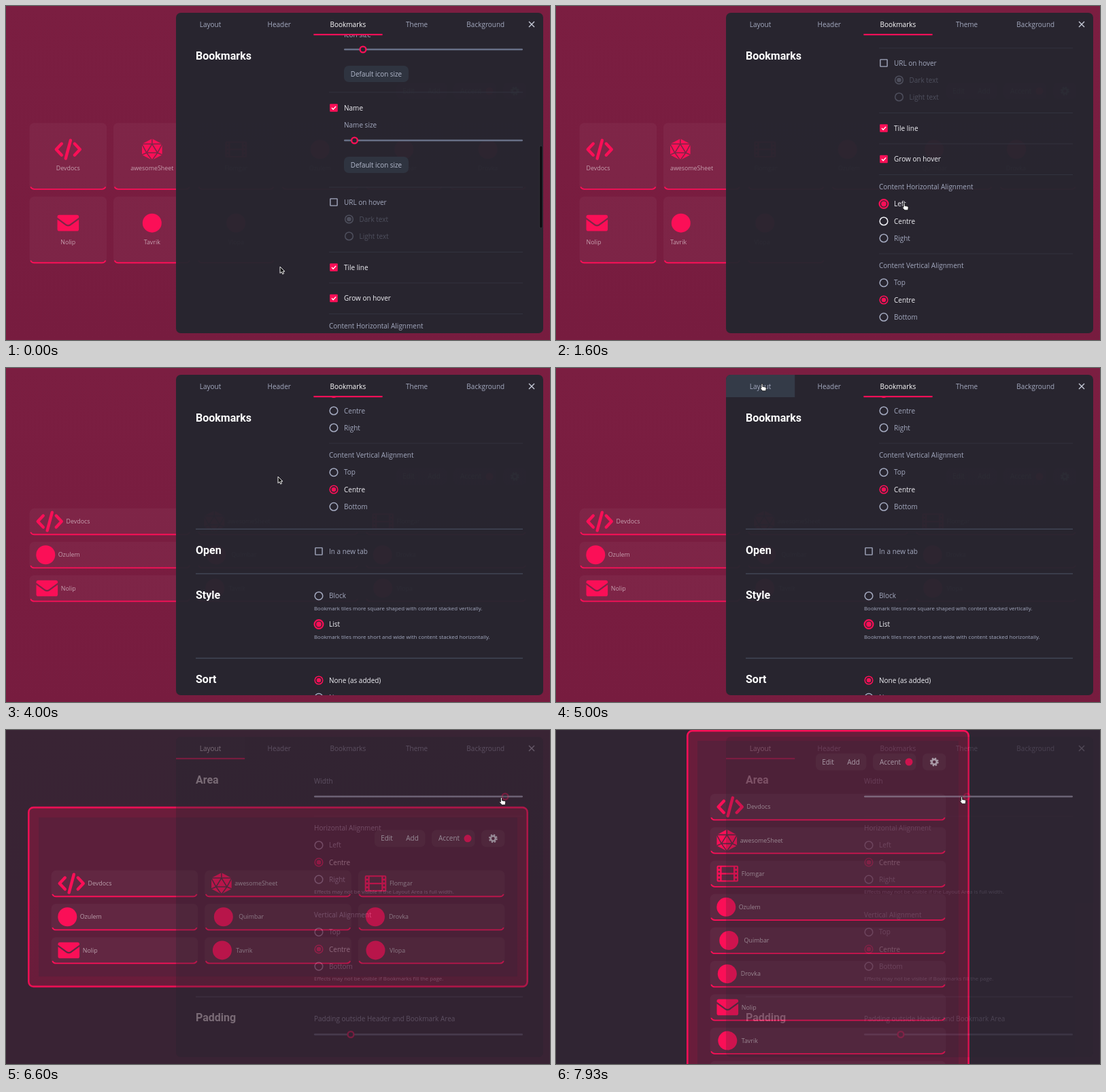
These frames come from a looping animation (800x492 px, 8000 ms). An HTML page:

```html
<!DOCTYPE html>
<html lang="en">
<head>
<meta charset="utf-8">
<title>Bookmark settings</title>
<style>
  html, body { margin: 0; width: 100%; height: 100%; overflow: hidden; background: #7a1e40; }
  svg { display: block; width: 100vw; height: 100vh; }
  text { font-family: "Open Sans", sans-serif; }
  .title { font-family: Roboto, sans-serif; font-stretch: 75%; font-weight: 600; }
</style>
</head>
<body>
<svg viewBox="0 0 800 492">
  <defs>
    <linearGradient id="page" x2="0" y2="1">
      <stop offset="0" stop-color="#7b1e41"/><stop offset="1" stop-color="#771c3f"/>
    </linearGradient>
    <clipPath id="body"><path d="M250 43H790V475a7 7 0 0 1-7 7H257a7 7 0 0 1-7-7Z"/></clipPath>
    <clipPath id="panel"><rect x="250" y="10" width="540" height="472" rx="7"/></clipPath>
    <mask id="facets" maskUnits="userSpaceOnUse" x="-16" y="-17" width="32" height="34">
      <rect x="-16" y="-17" width="32" height="34" fill="#fff"/>
      <path d="M0-16V-8L-8 5H8L0-8M-15-8L0-8 15-8 8 5 15 8M-15-8L-8 5-15 8M-8 5L0 16 8 5" fill="none" stroke="#000" stroke-width="1.6"/>
    </mask>
    <g id="code" fill="none" stroke="#fb0f57" stroke-width="4.4" stroke-linecap="round" stroke-linejoin="round">
      <path d="M-9.5-8.5L-17.5 0-9.5 8.5M9.5-8.5L17.5 0 9.5 8.5M3.6-13.4L-3.6 13.4"/>
    </g>
    <path id="die" d="M0-15.8L14.8-8V8L0 15.8-14.8 8V-8Z" mask="url(#facets)"/>
    <g id="mail">
      <path d="M-15.8-9Q-15.8-11.8-13-11.8H13Q15.8-11.8 15.8-9V-8L2.5 1.8Q0 3.4-2.5 1.8L-15.8-8Z"/>
      <path d="M-15.8-5.2L-3.5 3.8Q0 6 3.5 3.8L15.8-5.2V9Q15.8 11.8 13 11.8H-13Q-15.8 11.8-15.8 9Z"/>
    </g>
    <path id="film" fill-rule="evenodd"/>
    <circle id="dot" r="14"/>
    <g id="gear" fill="none" stroke="#cbb9c6">
      <circle r="3.6" stroke-width="2.6"/>
      <circle r="5.4" stroke-width="2" stroke-dasharray="2.4 1.84"/>
    </g>
    <path id="arrow" d="M0 0V9.6L2.2 7.6 3.8 11 5.5 10.2 4 7H7Z" fill="#111" stroke="#fff" stroke-width=".9"/>
    <path id="hand" d="M-1 1a1 1 0 0 1 2 0V4.4L5 5.1Q6.4 5.5 6.2 7L5.6 10.8H.8L-2.8 6.8Q-2.5 5.5-1 6.5Z" fill="#fff" stroke="#111" stroke-width=".8"/>
  </defs>
  <g id="scene"></g>
</svg>
<script>
const LOOP = 8000, RED = '#fb0f57', GREY = '#a3a9bf', WHITE = '#f0f0f5', PANEL = '#26262f';
const CLICK_LEFT = 1520, CLICK_LIST = 3540, CLICK_LAYOUT = 5100, DRAG = 6330;
const scene = document.getElementById('scene');

// label, icon, icon width
const BOOKMARKS = [
  ['Devdocs', 'code', 39.5], ['awesomeSheet', 'die', 29.6], ['Flomgar', 'film', 31.6],
  ['Ozulem', 'dot', 27.6], ['Quimbar', 'dot', 35.5], ['Drovka', 'dot', 30.6],
  ['Nolip', 'mail', 31.6], ['Tavrik', 'dot', 31.6], ['Vlopa', 'dot', 31.6]
];

const hole = (x, y, w, h) => `M${x} ${y}h${w}v${h}h${-w}Z`;
document.getElementById('film').setAttribute('d',
  'M-13.8-11.8H13.8Q15.8-11.8 15.8-9.8V9.8Q15.8 11.8 13.8 11.8H-13.8Q-15.8 11.8-15.8 9.8V-9.8Q-15.8-11.8-13.8-11.8Z' +
  hole(-8.7, -9.8, 17.4, 8.7) + hole(-8.7, 1.1, 17.4, 8.7) +
  [-9.8, -4.2, 1.5, 7.1].map(y => hole(-13.7, y, 2.6, 2.7) + hole(11.1, y, 2.6, 2.7)).join(''));

const clamp = v => Math.max(0, Math.min(1, v));
const smooth = v => v * v * (3 - 2 * v);
const linear = v => v;

// Value of a [time, value] track at time t
function track(t, keys, ease = smooth) {
  const i = keys.findIndex(k => k[0] > t);
  if (i === 0) return keys[0][1];
  if (i < 0) return keys[keys.length - 1][1];
  const [t0, a] = keys[i - 1], [t1, b] = keys[i];
  return a + (b - a) * ease((t - t0) / (t1 - t0));
}

const text = (x, y, s, fill = GREY, size = 10, extra = '') =>
  `<text x="${x}" y="${y + size * .36}" font-size="${size}" fill="${fill}" ${extra}>${s}</text>`;
const middle = 'text-anchor="middle"';
const title = (y, s) => text(279, y, s, '#fff', 16, 'class="title"');
const box = (x, y, w, h, fill, r = 0, extra = '') =>
  `<rect x="${x}" y="${y}" width="${w}" height="${h}" rx="${r}" fill="${fill}" ${extra}/>`;
const use = (id, x, y) => `<use href="#${id}" x="${x}" y="${y}" fill="${RED}"/>`;
const faintRule = (y, x = 475) => box(x, y - .5, 760 - x, 1, '#32333f');
const rule = y => box(279, y - .7, 481, 1.4, '#424858');
const note = (y, s) => text(453, y, s, GREY, 7.9);
const rail = (x, y) => box(x, y - 1.2, 760 - x, 2.4, '#687087', 1.2);
const knob = (x, y) => `<circle cx="${x}" cy="${y}" r="4.4" fill="${PANEL}" stroke="${RED}" stroke-width="2.3"/>`;
const button = (y, s) => box(497, y - 12, 95, 24, '#2f3440', 7) + text(544.5, y, s, '#b3b9cc', 9.9, middle);

function radio(x, y, s, on, { focus = false, lit = on, off = false } = {}) {
  const color = off ? '#6d7283' : on ? RED : lit ? WHITE : GREY;
  return `<g opacity="${off ? .55 : 1}"><circle cx="${x}" cy="${y}" r="${focus ? 6.4 : 5.8}" fill="none" stroke="${color}" stroke-width="${focus ? 2.2 : 1.5}"/>` +
    (on ? `<circle cx="${x}" cy="${y}" r="${focus ? 3.9 : 3.3}" fill="${color}"/>` : '') +
    text(x + 15, y, s, off ? color : lit ? WHITE : GREY) + '</g>';
}

function check(x, y, s, on) {
  const mark = on
    ? box(x - 5.8, y - 5.8, 11.6, 11.6, RED, 1) + `<path d="M${x - 3} ${y}l2.2 2.3 4-4.4" fill="none" stroke="#fff" stroke-width="1.4"/>`
    : box(x - 5.1, y - 5.1, 10.2, 10.2, 'none', .5, `stroke="${GREY}" stroke-width="1.4"`);
  return mark + text(x + 15, y, s, on ? WHITE : GREY);
}

function tile([label, icon, iconWidth], x, y, w, h, list, left) {
  const b = y + h - 1, color = '#fff';
  let s = box(x, y, w, h, '#fff', 7, 'fill-opacity=".035"') +
    `<path d="M${x + 1.6} ${b - 3.4}Q${x + 3.4} ${b} ${x + 7} ${b}H${x + w - 7}Q${x + w - 3.4} ${b} ${x + w - 1.6} ${b - 3.4}" fill="none" stroke="${RED}" stroke-width="1.8"/>`;
  const dim = 'fill-opacity=".56"', start = x + 10;
  if (list) return s + use(icon, start + iconWidth / 2, y + h / 2 - .5) +
    text(start + iconWidth + 4.6, y + h / 2 - .5, label, color, 8.9, dim);
  return s + (left
    ? use(icon, start + iconWidth / 2, y + 39) + text(start, y + 67, label, color, 8.9, dim)
    : use(icon, x + w / 2, y + 39) + text(x + w / 2, y + 67, label, color, 8.9, dim + middle.padStart(middle.length + 1)));
}

function headerButtons(right, y) {
  const back = (x, w) => box(right - x, y, w, 25, '#fff', 7, 'fill-opacity=".045"');
  const c = y + 12.5, ink = '#cbb9c6';
  return back(191.5, 74.5) + back(107.5, 63.5) + back(34.5, 34.5) +
    text(right - 173.5, c, 'Edit', ink, 10, middle) + text(right - 136, c, 'Add', ink, 10, middle) +
    text(right - 97.5, c, 'Accent', ink) + `<circle cx="${right - 54.5}" cy="${c}" r="5.5" fill="${RED}"/>` +
    use('gear', right - 17.2, c);
}

function page(t, percent, edit) {
  const list = t >= CLICK_LIST, left = t >= CLICK_LEFT;
  const pad = 34.5, gap = 9.8, width = 8 * percent, x = 400 - width / 2, inner = width - 2 * pad;
  const columns = list ? Math.max(1, Math.floor((inner + gap) / (205 + gap))) : 6;
  const w = (inner - gap * (columns - 1)) / columns, h = list ? 39.4 : 98.6;
  const rows = Math.ceil(BOOKMARKS.length / columns);
  const height = 2 * pad + 59.5 + rows * (h + gap) - gap;
  const top = Math.max(0, 246 - height / 2);
  return box(0, 0, 800, 492, 'url(#page)') +
    `<g opacity="${edit}">` + box(0, 0, 800, 492, '#302533') +
    box(x + 1.3, top + 1.3, width - 2.6, height - 2.6, '#691d3b', 7, `stroke="${RED}" stroke-width="2.6"`) +
    box(x + 16, top + 16, width - 32, height - 32, '#58203b') + '</g>' +
    headerButtons(x + width - pad, top + pad) +
    BOOKMARKS.map((b, i) => tile(b, x + pad + (i % columns) * (w + gap),
      top + pad + 59.5 + Math.floor(i / columns) * (h + gap), w, h, list, left)).join('');
}

function bookmarksTab(t) {
  const scroll = track(t, [[70, 0], [870, 205], [1790, 205], [2440, 427.5], [2600, 427.5], [2900, 459]]);
  const left = t >= CLICK_LEFT, list = t >= CLICK_LIST;
  const bar = track(t, [[870, 1], [1100, 0], [1790, 0], [1860, 1], [3150, 1], [3400, 0]]);
  return title(73, 'Bookmarks') + `<g transform="translate(0 ${-scroll})">` +
    text(497, 42, 'Icon size') + rail(497, 64) + knob(525, 64) + button(100, 'Default icon size') + faintRule(127) +
    check(482, 150, 'Name', true) + text(497, 175, 'Name size') + rail(497, 198) + knob(512.5, 198) +
    button(234, 'Default icon size') + faintRule(267) +
    check(482, 289, 'URL on hover', false) +
    radio(504.5, 314, 'Dark text', true, { off: true }) + radio(504.5, 339, 'Light text', false, { off: true }) + faintRule(362.5) +
    check(482, 385, 'Tile line', true) + faintRule(408) + check(482, 430.5, 'Grow on hover', true) + faintRule(453.5) +
    text(475, 471, 'Content Horizontal Alignment') +
    radio(482, 496.5, 'Left', left, { focus: left && !list }) +
    radio(482, 522, 'Centre', !left, { lit: t < 1700 }) + radio(482, 547, 'Right', false) + faintRule(570) +
    text(475, 587.5, 'Content Vertical Alignment') +
    radio(482, 612.7, 'Top', false) + radio(482, 638, 'Centre', true) + radio(482, 663.3, 'Bottom', false) + rule(696.3) +
    title(727.5, 'Open') + check(460, 729, 'In a new tab', false) + rule(762) +
    title(793, 'Style') + radio(460, 794.7, 'Block', !list) +
    note(813, 'Bookmark tiles more square shaped with content stacked vertically.') +
    radio(460, 836.5, 'List', list, { focus: list }) +
    note(855, 'Bookmark tiles more short and wide with content stacked horizontally.') + rule(886.5) +
    title(917, 'Sort') + radio(460, 919, 'None (as added)', true) + radio(460, 944.3, 'Name', false) + '</g>' +
    box(784.8, 206 + scroll * .281, 4, 121, '#0b0b0e', 2, `stroke="#3c3c46" stroke-width=".6" opacity="${bar}"`);
}

function layoutTab(knobX) {
  const align = (y, label, names, hint) => text(453, y, label) +
    names.map((n, i) => radio(460, y + 25.2 + i * 25.2, n, i === 1)).join('') + note(y + 94, hint);
  return title(73, 'Area') + text(453, 75, 'Width') + rail(453, 98) + knob(knobX, 98) + faintRule(127, 453) +
    align(144.5, 'Horizontal Alignment', ['Left', 'Centre', 'Right'], 'Effects may not be visible if the Layout Area is full width.') +
    align(272.5, 'Vertical Alignment', ['Top', 'Centre', 'Bottom'], 'Effects may not be visible if Bookmarks fill the page.') +
    rule(393) + title(423.5, 'Padding') + text(453, 425.5, 'Padding outside Header and Bookmark Area') +
    rail(453, 448.5) + knob(507, 448.5);
}

function panel(t, knobX, edit) {
  const active = t < CLICK_LAYOUT ? 2 : 0, tab = 101.2;
  const hover = clamp((t - 4380) / 120);
  const swap = clamp((t - CLICK_LAYOUT) / 200);
  const names = ['Layout', 'Header', 'Bookmarks', 'Theme', 'Background'];
  return `<g opacity="${1 - .78 * edit}">` + box(250, 10, 540, 472, PANEL, 7, 'fill-opacity=".965"') +
    `<g clip-path="url(#panel)">` + box(250, 10, tab, 33, '#343b48', 0, `opacity="${hover * (1 - edit)}"`) +
    box(250 + active * tab, 41, tab, 2.2, RED) + '</g>' +
    names.map((n, i) => text(300.5 + i * tab, 27, n, i === active ? '#fff' : GREY, 10, middle)).join('') +
    `<path d="M769 23l8 8m0-8l-8 8" stroke="#c6cad8" stroke-width="1.4"/>` +
    `<g clip-path="url(#body)">` +
    (active ? bookmarksTab(t) : `<g opacity="${swap}">${layoutTab(knobX)}</g>`) + '</g></g>' +
    (edit ? `<g opacity="${.5 * edit}">${box(453, 96.8, 307, 2.4, '#9a93a6', 1.2)}</g>` : '');
}

function cursor(t, drag) {
  const x = track(t, [[930, 403], [1450, 512], [2700, 512], [3350, 484], [3600, 484], [4000, 400],
    [4450, 303], [5270, 303], [5670, 719], [5870, 719], [6130, 755]]) - 3.3 * drag;
  const y = track(t, [[930, 384], [1450, 290], [1800, 290], [2440, 291], [2700, 291], [3350, 374], [3600, 374], [4000, 160],
    [4450, 23], [5270, 23], [5670, 97], [5870, 97], [6130, 98], [DRAG, 98], [6870, 101], [7930, 98]]);
  const pointing = [[1400, 2680], [3200, 3660], [4390, 5310], [5640, LOOP]].some(([a, b]) => t >= a && t < b);
  return use(pointing ? 'hand' : 'arrow', x, y);
}

function render(now) {
  const t = now % LOOP;
  const width = track(t, [[DRAG, 100], [6870, 84], [7130, 78], [7930, 52]], linear);
  const percent = Math.round(width);
  const edit = smooth(clamp((t - DRAG) / 350));
  scene.innerHTML = page(t, percent, edit) +
    panel(t, 760 - (100 - percent) * 3.24, edit) + cursor(t, 100 - width);
}

const start = performance.now();
(function frame() {
  render(performance.now() - start);
  requestAnimationFrame(frame);
})();
</script>
</body>
</html>
```
